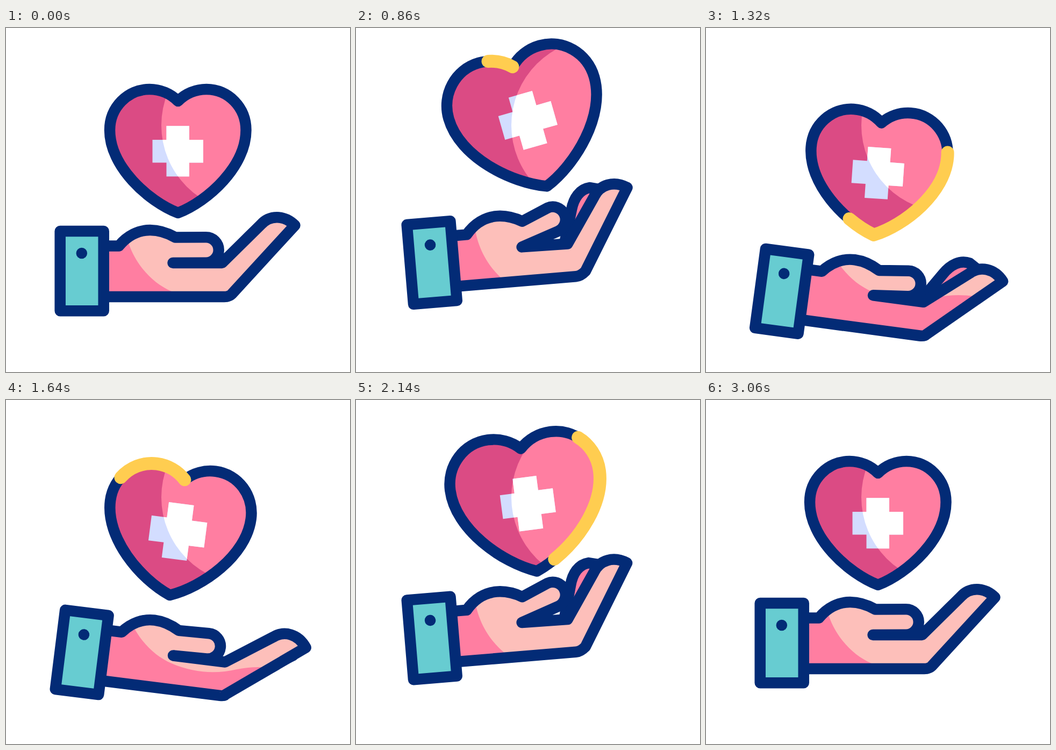
An HTML page for the animation above (3.6 s loop, 640x640 px).

```html
<!DOCTYPE html>
<html lang="en">
<head>
<meta charset="utf-8">
<title>Caring hand</title>
<style>
  html, body { margin: 0; width: 100%; height: 100%; overflow: hidden; background: #fff; }
  svg { display: block; width: 100%; height: 100%; }
  .line { fill: none; stroke: #032b76; stroke-width: 20.5; stroke-linecap: round; stroke-linejoin: round; }
  .pink { fill: #ff7ea1; }
  .rose { fill: #db4b84; }
  .skin { fill: #fdbfba; }
  .teal { fill: #67ccd1; }
  .pale { fill: #d3ddff; }
  .white { fill: #fff; }
  .navy { fill: #032b76; }
  #spark { stroke: #ffcd50; }
</style>
</head>
<body>
<svg viewBox="0 0 640 640">
  <defs>
    <path id="heartShape" d="M320 136 C334 122 353 114 373 114 C414 114 446.5 148 446.5 190
      C446.5 257 376.5 322 320 344 C263.5 322 193 257 193 190 C193 148 226 114 267 114 C287 114 306 122 320 136 Z"/>
    <path id="crossShape" d="M298.5 182.2 h42.4 v25.9 h26 v42.4 h-26 v25.7 h-42.4 v-25.7 h-26 v-42.4 h26 Z"/>
    <!-- Lighting stays still while the shapes move through it -->
    <clipPath id="heartLight"><circle cx="450.5" cy="181" r="161.5"/></clipPath>
    <clipPath id="handLight">
      <path d="M220 250 V360 C224 420 262 470 308 490 C350 508 390 510 430 501 C455 496 475 496 500 499 L640 520 V250 Z"/>
    </clipPath>
  </defs>

  <g class="hand">
    <path class="back pink"/>
    <path class="back line"/>
    <path class="palm pink"/>
  </g>
  <g clip-path="url(#handLight)"><g class="hand"><path class="palm skin"/></g></g>
  <g class="hand">
    <path class="palm line"/>
    <rect class="teal" x="100.7" y="378" width="81" height="148.3"/>
    <rect class="line" x="100.7" y="378" width="81" height="148.3"/>
    <circle class="navy" cx="140.8" cy="419" r="10.3"/>
  </g>

  <g class="heart"><use href="#heartShape" class="rose"/></g>
  <g clip-path="url(#heartLight)"><g class="heart"><use href="#heartShape" class="pink"/></g></g>
  <g class="cross"><use href="#crossShape" class="pale"/></g>
  <g clip-path="url(#heartLight)"><g class="cross"><use href="#crossShape" class="white"/></g></g>
  <g class="heart">
    <use href="#heartShape" class="line" id="rim"/>
    <path class="line" id="spark" pathLength="1"/>
  </g>
</svg>

<script>
const LOOP = 3600, STEP = 20;
const byId = id => document.getElementById(id);
const setAll = (sel, name, value) =>
  document.querySelectorAll(sel).forEach(el => el.setAttribute(name, value));

const clamp = (x, lo, hi) => Math.min(hi, Math.max(lo, x));
const ease = u => 0.5 - 0.5 * Math.cos(Math.PI * clamp(u, 0, 1));

// Swings from rest through three peaks, one per beat, and back to rest
function wave(start, beat, ...peaks) {
  const stops = [0, ...peaks, 0];
  return t => {
    const x = (t - start) / beat;
    const i = clamp(Math.floor(x), 0, peaks.length);
    return stops[i] + (stops[i + 1] - stops[i]) * ease(x - i);
  };
}

const handY = wave(70, 640, -23.5, 38, -10.5);
const handTurn = wave(220, 625, -4.8, 9.6, -4.8);
const thumbTurn = wave(300, 620, -20.5, 0, -20.5);
const fingerTurn = wave(300, 620, -11.5, 11.5, -11.5);
const backTurn = wave(400, 620, -33, 11.5, -33);
const heartY = wave(130, 630, -64, 44, -40);
const heartTurn = wave(230, 640, -16, 9, -7.5);
const heartGrow = wave(150, 620, 0.117, 0, 0.117);
const crossGrow = wave(0, 600, 0.125, 0, 0.125);

// Returns a function that turns a point about the finger root
function knuckle(deg) {
  const a = deg * Math.PI / 180, c = Math.cos(a), s = Math.sin(a);
  return (x, y) => {
    const dx = x - 405, dy = y - 470;
    return `${(405 + dx * c - dy * s).toFixed(2)} ${(470 + dx * s + dy * c).toFixed(2)} `;
  };
}

function palmPath(thumb, finger) {
  const a = thumb * Math.PI / 180, r = 23.75;
  const cx = 372, cy = 413 + thumb * 1.1;
  const dx = r * Math.sin(a), dy = r * Math.cos(a);
  const p = knuckle(finger);
  return `M182 405.5 H210 C226 386 247 376 268 376 C285 376 300 381 315 389.5
    L${cx + dx} ${cy - dy} A${r} ${r} 0 0 1 ${cx - dx} ${cy + dy} L310.5 437
    L${p(402, 437)} L${p(474, 366)} C${p(490, 348)} ${p(517, 347)} ${p(537.5, 367)}
    L${p(420, 495)} Q415 500 406 500 H182`;
}

function backPath(turn) {
  const p = knuckle(turn);
  return `M${p(411, 430)} L${p(452, 388)} C${p(467, 372)} ${p(486, 364)} ${p(503, 372)}
    L${p(517, 385)} L${p(425, 475)} Z`;
}

// The spark runs clockwise from the dip, three laps in all
function drawSpark(t) {
  const lap = 870, laps = 3, lead = 85;
  const n = Math.floor((t - lead) / lap);
  const local = t - n * lap;
  const head = ease((local - lead) / 670), tail = ease((local - 215) / 760);
  const spark = byId('spark');
  spark.style.display = n >= 0 && n < laps && head - tail > 0.002 ? '' : 'none';
  spark.setAttribute('stroke-dasharray', `${Math.max(0.001, head - tail)} 2`);
  spark.setAttribute('stroke-dashoffset', -tail);
}

function draw(t) {
  setAll('.hand', 'transform', `translate(0 ${handY(t)}) rotate(${handTurn(t)} 141 452)`);
  setAll('.palm', 'd', palmPath(thumbTurn(t), fingerTurn(t)));
  setAll('.back', 'd', backPath(backTurn(t)));

  const size = 1 + heartGrow(t);
  const place = k =>
    `translate(320 ${229 + heartY(t)}) rotate(${heartTurn(t)}) scale(${k}) translate(-320 -229)`;
  setAll('.heart', 'transform', place(size));
  setAll('.cross', 'transform', place(1 + crossGrow(t)));
  byId('rim').style.strokeWidth = 20.5 / size;
  byId('spark').style.strokeWidth = 24 / size;
  drawSpark(t);
}

function tick() {
  const t = performance.now() % LOOP;
  draw(Math.floor(t / STEP) * STEP);
  requestAnimationFrame(tick);
}

byId('spark').setAttribute('d', byId('heartShape').getAttribute('d'));
draw(0);
requestAnimationFrame(tick);
</script>
</body>
</html>
```
